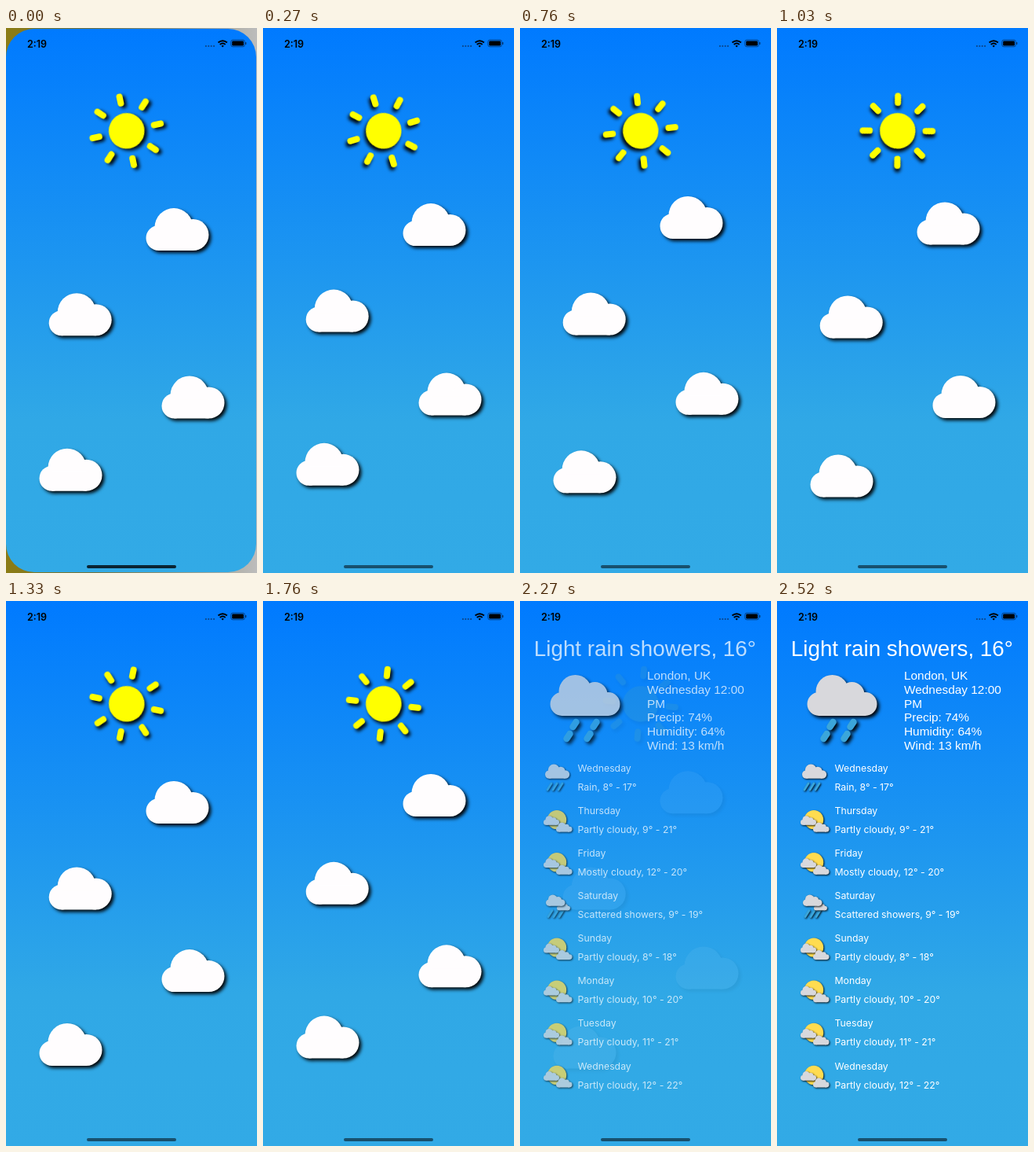
Recreate the animation shown at these times as an HTML page. Size 320 by 693 pixels, loop 2560 ms.

```html
<!DOCTYPE html>
<html lang="en">
<head>
<meta charset="utf-8">
<style>
  html, body { margin: 0; height: 100%; overflow: hidden; }
  svg { display: block; width: 320px; height: 693px; }
  .shadow { filter: drop-shadow(3px 3px 2px rgba(0, 0, 0, .95)); }
  .soft { filter: drop-shadow(1.6px 1.6px 1.1px rgba(0, 0, 0, .9)); }
  .large { font: 27.8px "Liberation Sans", Arial, sans-serif; }
  .details { font: 15.4px "Liberation Sans", Arial, sans-serif; }
  .days { font: 12.3px Inter, sans-serif; }
  .clock { font: 600 12.5px Inter, sans-serif; }
</style>
</head>
<body>
<svg viewBox="0 0 320 693">
  <defs>
    <linearGradient id="sky" x2="0" y2="1">
      <stop stop-color="#007aff"/>
      <stop offset=".72" stop-color="#30a8e6"/>
      <stop offset="1" stop-color="#32aae6"/>
    </linearGradient>
    <linearGradient id="wallpaper">
      <stop stop-color="#8c7c14"/>
      <stop offset=".35" stop-color="#77733a"/>
      <stop offset="1" stop-color="#bcbcbc"/>
    </linearGradient>
    <g id="puff">
      <circle cx="16" cy="38" r="16"/>
      <circle cx="35.5" cy="24.5" r="24.5"/>
      <circle cx="60" cy="34" r="20"/>
      <path d="M16 30h44v24H16z"/>
    </g>
    <g id="grey" fill="#d8d8dc">
      <circle cx="15" cy="37" r="15"/>
      <circle cx="32" cy="21" r="21"/>
      <circle cx="57" cy="25" r="16"/>
      <circle cx="74" cy="37" r="15"/>
      <path d="M15 24h59v28H15z"/>
    </g>
    <path id="drops" d="M33 60l-4 6M59 60l-4 6M25 75l-4 6M51 75l-4 6" stroke="#3ba6da" stroke-width="8.5" stroke-linecap="round"/>
    <path id="streaks" d="M6 28l5-8M13 28l5-8M20 28l5-8" stroke="#3ba6da" stroke-width="2.8" stroke-linecap="round"/>
    <g id="rain">
      <g class="soft"><use href="#streaks" x="-1" y="1"/></g>
      <g class="soft"><use href="#grey" transform="translate(2 -3.5) scale(.35)"/></g>
    </g>
    <g id="partly">
      <g class="soft"><circle cx="17" cy="13" r="12.2" fill="#ffdc50"/></g>
      <g class="soft"><use href="#grey" transform="translate(0 8) scale(.225)"/></g>
      <g class="soft"><use href="#grey" transform="translate(16 16.5) scale(.23)"/></g>
    </g>
    <g id="scattered">
      <g class="soft"><use href="#streaks"/></g>
      <g class="soft"><use href="#grey" transform="translate(17 10) scale(.19)"/></g>
      <g class="soft"><use href="#grey" transform="translate(3) scale(.275)"/></g>
    </g>
  </defs>
  <path fill="url(#wallpaper)" d="M0 0h320v693H0z"/>
  <rect id="screen" fill="url(#sky)"/>
  <g id="scene"></g>
  <g id="weather" fill="#fff">
    <text class="large" x="17.8" y="70">Light rain showers, 16°</text>
    <g class="shadow" transform="translate(38.5 94)"><use href="#drops"/><use href="#grey"/></g>
    <g id="details" class="details"></g>
    <g id="days" class="days"></g>
  </g>
  <text class="clock" x="27" y="24.5">2:19</text>
  <path d="M254 23h12" stroke="#0b4890" stroke-width="1.8" stroke-dasharray="1.8 1.6"/>
  <g fill="none" stroke="#000" stroke-width="1.9">
    <path d="M270.5 18.6q5.7-4.8 11.4 0M272.7 21q3.5-2.8 7 0"/>
    <path d="M276.2 24.6l-1.7-1.9q1.7-1.2 3.4 0z" fill="#000" stroke="none"/>
    <rect x="286.8" y="15.2" width="17.6" height="8.6" rx="2.4" stroke="#05356f" stroke-width=".8"/>
    <rect x="288.2" y="16.6" width="14.8" height="5.8" rx="1.2" fill="#000" stroke="none"/>
    <path d="M305.8 18v3" stroke="#05356f" stroke-width="1.2"/>
  </g>
  <rect id="bar" x="103" y="683" width="114" height="4" rx="2"/>
</svg>
<script>
const LOOP = 2560, BOB = 1400;
const $ = id => document.getElementById(id);
const repeat = (n, f) => Array.from({ length: n }, (_, i) => f(i)).join('');

// left edge, mean top, swing, time of the highest point
const clouds = [
  [178.5, 221.2, 7.9, 675],
  [54.7, 336.2, 4.4, 400],
  [198.5, 439.8, 3.6, 540],
  [42.5, 535, 7.5, 340]
];
// time, sun angle
const turns = [[-600, -162], [500, 100], [1450, 8], [2000, 5.5], [2560, 5.5]];

const details = ['London, UK', 'Wednesday 12:00', 'PM', 'Precip: 74%', 'Humidity: 64%', 'Wind: 13 km/h'];
const days = [
  ['Wednesday', 'Rain, 8° - 17°', 'rain'],
  ['Thursday', 'Partly cloudy, 9° - 21°'],
  ['Friday', 'Mostly cloudy, 12° - 20°'],
  ['Saturday', 'Scattered showers, 9° - 19°', 'scattered'],
  ['Sunday', 'Partly cloudy, 8° - 18°'],
  ['Monday', 'Partly cloudy, 10° - 20°'],
  ['Tuesday', 'Partly cloudy, 11° - 21°'],
  ['Wednesday', 'Partly cloudy, 12° - 22°']
];

$('scene').innerHTML = `
  <g id="sun"><g class="shadow" fill="#ff0" stroke="#ff0" stroke-width="8" stroke-linecap="round">
    <circle r="22.8" stroke="none"/>
    ${repeat(8, i => `<path d="M0-44.3V-35.7" transform="rotate(${i * 45})"/>`)}
  </g></g>
  ${repeat(clouds.length, i => `<g id="cloud${i}"><use class="shadow" href="#puff" fill="#fffdfe"/></g>`)}`;

$('details').innerHTML = repeat(details.length, i =>
  `<text x="162" y="${100 + i * 17.75}">${details[i]}</text>`);

$('days').innerHTML = repeat(days.length, i => {
  const [day, forecast, icon = 'partly'] = days[i];
  return `<g transform="translate(0 ${i * 54.15})">
    <use href="#${icon}" x="30" y="211"/>
    <text x="73.5" y="216.5">${day}</text>
    <text x="73.5" y="240.5">${forecast}</text></g>`;
});

function ease(p) {
  p = Math.min(1, Math.max(0, p));
  return (1 - Math.cos(Math.PI * p)) / 2;
}

function sunAngle(t) {
  const i = turns.findIndex(([end]) => t < end);
  const [t0, a0] = turns[i - 1], [t1, a1] = turns[i];
  return a0 + (a1 - a0) * ease((t - t0) / (t1 - t0));
}

function setAttributes(el, values) {
  for (const name in values) el.setAttribute(name, values[name]);
}

function draw(now) {
  const t = now % LOOP;
  const inset = t < 30;
  setAttributes($('screen'), inset
    ? { y: 1, width: 319, height: 691, rx: 36 }
    : { y: 0, width: 320, height: 693, rx: 0 });
  setAttributes($('bar'), { fill: inset ? '#0a2433' : '#17506e' });
  setAttributes($('sun'), { transform: `translate(153.8 130.8) rotate(${sunAngle(t)})` });
  clouds.forEach(([x, y, swing, top], i) => {
    const dy = -swing * Math.cos(2 * Math.PI * (t - top) / BOB);
    setAttributes($('cloud' + i), { transform: `translate(${x} ${y + dy})` });
  });
  $('scene').style.opacity = 1 - ease((t - 1890) / 450);
  $('weather').style.opacity = ease((t - 1910) / 550);
}

function tick() {
  draw(performance.now());
  requestAnimationFrame(tick);
}
tick();
</script>
</body>
</html>
```
